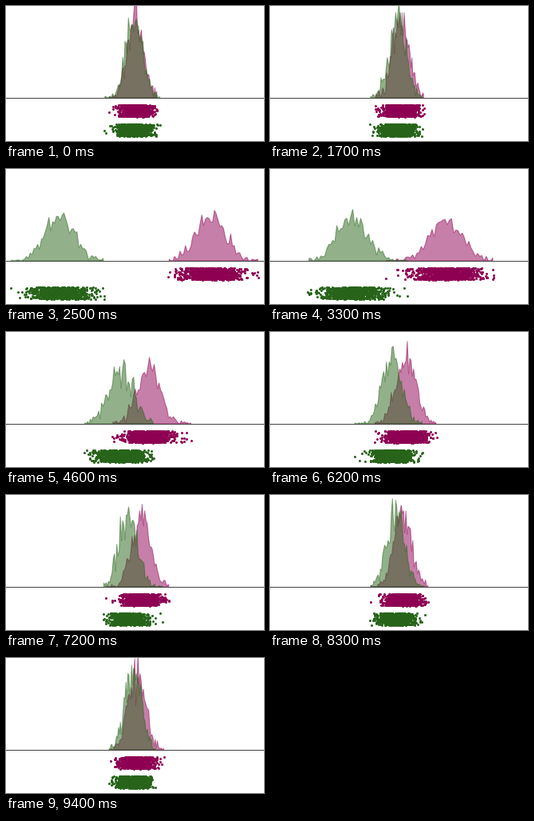
A matplotlib script for the animation above (9.5 s loop, 323x169 px).

```python
import numpy as np
import matplotlib.pyplot as plt
from matplotlib.animation import FuncAnimation
from matplotlib.patches import Polygon

W, H, DPI = 323, 169, 64
PX = 72 / DPI                     # one pixel in points
FRAMES, STEP = 95, 100
SAMPLES, BINS = 1000, 50
BASE, CENTRE, AREA = 115, 161.8, 2560
MAGENTA, GREEN = "#8e0152", "#276419"

# Half distance between the means and spread, in pixels, over seconds
GAP_T = [0, 1.7, 2.0, 2.2, 3.0, 3.3, 4.0, 4.6, 5.0, 6.2, 7.2, 9.4]
GAP = [1, 2, 85, 108, 76, 59, 32, 17, 14, 9, 8, 2.5]
SPREAD_T = [0, 1.7, 2.0, 2.4, 3.0, 3.3, 4.0, 4.6, 6.2, 7.2, 9.4]
SPREAD = [10.3, 10.3, 15, 18, 20, 20, 17, 14.7, 12.6, 11.6, 10.2]

fig = plt.figure(figsize=(W / DPI, H / DPI), dpi=DPI, facecolor="white")
ax = fig.add_axes([0, 0, 1, 1])
ax.set(xlim=(0, W), ylim=(H, 0))
ax.axis("off")


class Group:
    """A histogram area above the axis and a strip of jittered dots below."""

    def __init__(self, color, side, top, z):
        self.side, self.top = side, top
        self.area = Polygon([(0, BASE), (1, BASE)], closed=True, color=color,
                            alpha=0.5, lw=1.1 * PX, zorder=z)
        ax.add_patch(self.area)
        self.dots = ax.scatter([], [], s=(3 * PX) ** 2, color=color,
                               linewidths=0, zorder=5)

    def update(self, rng, gap, spread):
        x = rng.normal(CENTRE + self.side * gap, spread, SAMPLES)
        y = rng.uniform(self.top, self.top + 15, SAMPLES)
        self.dots.set_offsets(np.column_stack([x, y]))

        density, edges = np.histogram(x, BINS, density=True)
        mid = (edges[:-1] + edges[1:]) / 2
        outline = np.column_stack([mid, BASE - AREA * density])
        self.area.set_xy(np.vstack([(mid[0], BASE), outline, (mid[-1], BASE)]))


groups = [Group(MAGENTA, 1, 123.6, 1), Group(GREEN, -1, 147.8, 2)]
ax.plot([0, W], [BASE, BASE], color="#444444", lw=PX, zorder=4)


def draw(frame):
    t = frame * STEP / 1000
    gap = np.exp(np.interp(t, GAP_T, np.log(GAP)))
    spread = np.interp(t, SPREAD_T, SPREAD)
    rng = np.random.default_rng(frame + 7)
    for group in groups:
        group.update(rng, gap, spread)
    return [a for g in groups for a in (g.area, g.dots)]


anim = FuncAnimation(fig, draw, frames=FRAMES, interval=STEP, repeat=True,
                     repeat_delay=0, blit=False)
plt.show()
```
